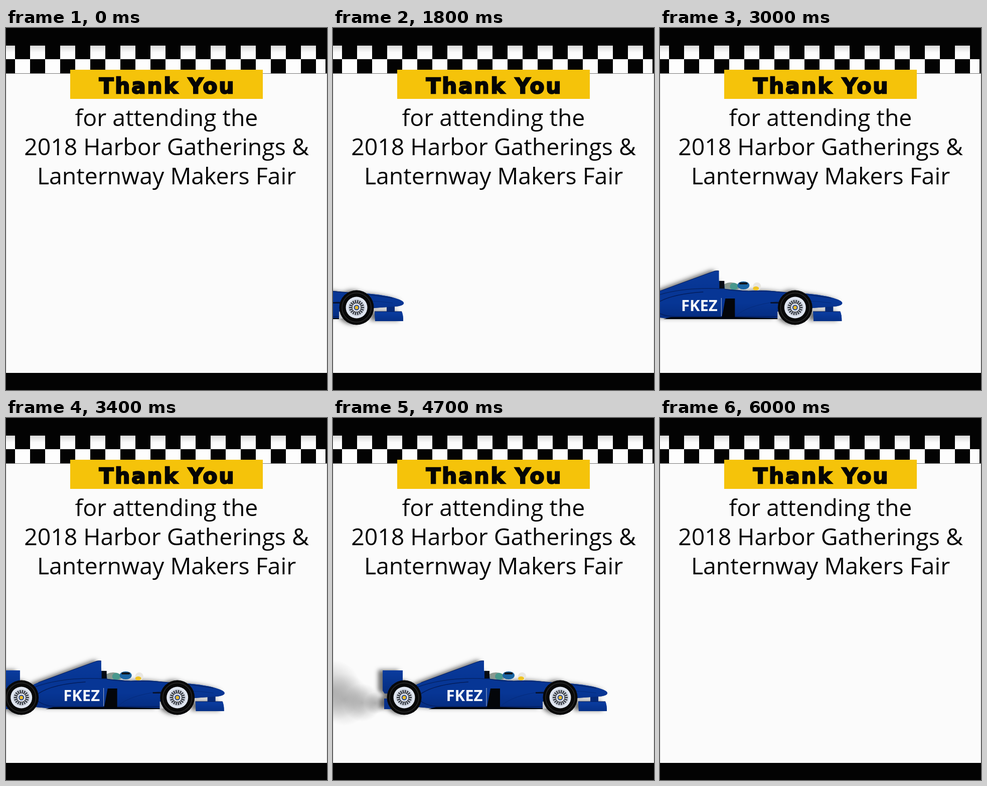
An HTML page with a canvas that plays this animation: 640 px wide and 720 px high, repeating every 8.1 s.

```html
<!DOCTYPE html>
<html lang="en">
<head>
<meta charset="utf-8">
<style>
  html, body { margin: 0; width: 100%; height: 100%; overflow: hidden; background: #fbfbfb; }
  canvas { display: block; width: 640px; height: 720px; }
</style>
</head>
<body>
<canvas id="stage" width="640" height="720"></canvas>
<script>
const ctx = document.getElementById('stage').getContext('2d');
const LOOP = 8100, STEP = 100, STOP_X = 547;
const BLUE = '#073695', DARK = '#031d5c', BLACK = '#030303';

const clamp = v => Math.max(0, Math.min(1, v));
const progress = (t, from, to) => clamp((t - from) / (to - from));
const lerp = (a, b, u) => a + (b - a) * u;

function rect(x, y, w, h, fill) {
  ctx.fillStyle = fill;
  ctx.fillRect(x, y, w, h);
}

function shape(d, fill) {
  ctx.fillStyle = fill;
  ctx.fill(new Path2D(d));
}

function line(d, color, width = 1) {
  ctx.strokeStyle = color;
  ctx.lineWidth = width;
  ctx.stroke(new Path2D(d));
}

function disc(x, y, r, fill) {
  oval(x, y, r, r, fill);
}

function oval(x, y, rx, ry, fill) {
  ctx.beginPath();
  ctx.ellipse(x, y, rx, ry, 0, 0, Math.PI * 2);
  ctx.fillStyle = fill;
  ctx.fill();
}

function label(text, x, y, font, color, { spacing = 0, outline = 0 } = {}) {
  ctx.font = font;
  ctx.textAlign = 'center';
  ctx.letterSpacing = spacing + 'px';
  ctx.fillStyle = ctx.strokeStyle = color;
  ctx.fillText(text, x + spacing / 2, y);
  if (outline) {
    ctx.lineWidth = outline;
    ctx.strokeText(text, x + spacing / 2, y);
  }
  ctx.letterSpacing = '0px';
}

function verticalFade(y0, y1, ...colors) {
  const g = ctx.createLinearGradient(0, y0, 0, y1);
  colors.forEach((c, i) => g.addColorStop(i / (colors.length - 1), c));
  return g;
}

function drawBackdrop() {
  rect(0, 0, 640, 720, '#fbfbfb');
  rect(0, 90, 1, 597, '#dedede');
  rect(639, 90, 1, 597, '#dedede');
  rect(0, 0, 640, 91, BLACK);
  const shade = verticalFade(35, 62, '#d8d8d8', '#fbfbfb', '#ffffff');
  for (let x = -12; x < 640; x += 60) {
    rect(x, 35, 30, 27, shade);
    rect(x + 30, 62, Math.min(30, 607 - x), 28, '#fdfdfd');
  }
  rect(0, 90, 640, 1, '#777');
  rect(0, 686, 640, 34, BLACK);
}

function drawHeading() {
  rect(128, 83, 384, 58, '#f5c30a');
  label('Thank You', 320, 130, '700 42px "DejaVu Sans", sans-serif', '#050505',
    { spacing: 3, outline: 2.5 });
  ['for attending the', '2018 Harbor Gatherings &', 'Lanternway Makers Fair'].forEach((text, i) =>
    label(text, 320, 195 + i * 58, '46.4px "Open Sans", "Noto Sans", sans-serif', '#050505'));
}

function drawWheel(x, y) {
  disc(x, y, 34.5, '#080808');
  ctx.beginPath();
  ctx.arc(x, y, 29, 0, Math.PI * 2);
  ctx.strokeStyle = '#2b2b2b';
  ctx.lineWidth = 1.5;
  ctx.stroke();
  disc(x, y, 21.5, '#dfe5f0');
  disc(x, y, 16, '#b9bfca');
  ctx.strokeStyle = '#262a32';
  ctx.lineWidth = 2;
  for (let i = 0; i < 18; i++) {
    const a = i * Math.PI / 9, c = Math.cos(a), s = Math.sin(a);
    ctx.beginPath();
    ctx.moveTo(x + c * 8, y + s * 8);
    ctx.lineTo(x + c * 15, y + s * 15);
    ctx.stroke();
  }
  disc(x, y, 8, '#e6e9ef');
  disc(x, y, 5.5, '#23448f');
  disc(x, y, 3.5, '#e8b92c');
}

const BODY = 'M150 545 Q158 533 176 526 Q230 506 288 485 Q294 482 301 483 L301 503 L311 505 ' +
  'L313 519 L360 523 Q395 520 430 526 Q496 528 525 536 Q547 542 547 547 Q547 553 528 554 ' +
  'L486 557 L418 564 L418 578 L205 578 L160 574 Z';
const WING = 'M99 502 H139 V530 L122 548 H103 L99 542 Z';
const TAIL = 'M102 558 H118 V579 H102 Z';
const FRONT_WING = 'M489 564 H543 Q546 570 546 583 H490 Z';

function drawShadow() {
  ctx.save();
  ctx.shadowColor = 'rgba(0,0,0,.55)';
  ctx.shadowBlur = 9;
  ctx.shadowOffsetX = -9;
  ctx.shadowOffsetY = -1;
  const silhouette = new Path2D(BODY);
  [WING, TAIL, FRONT_WING].forEach(d => silhouette.addPath(new Path2D(d)));
  for (const x of [142, 453]) {
    silhouette.moveTo(x + 34, 556);
    silhouette.arc(x, 556, 34, 0, Math.PI * 2);
  }
  ctx.fillStyle = BLUE;
  ctx.fill(silhouette);
  ctx.restore();
}

function drawRiders() {
  oval(325, 515, 17, 9, '#8b9990');
  oval(331, 514, 8, 7, '#48988c');
  oval(350, 512, 12, 8, '#1b65a4');
  rect(342, 506, 16, 4, '#11151c');
  oval(377, 514, 8, 8, '#e9e7e2');
  oval(375, 518, 6, 4, '#efc426');
}

function drawCar(nose) {
  ctx.save();
  ctx.translate(nose - STOP_X, 0);
  drawShadow();
  drawRiders();
  shape(WING, verticalFade(502, 548, '#0a3c9f', '#052c7d'));
  shape(TAIL, '#06308a');
  rect(513, 552, 16, 13, '#052a78');
  shape(BODY, verticalFade(483, 578, '#0a3a9b', BLUE, BLUE, '#052c80'));
  rect(302, 503, 10, 15, '#070b14');

  line('M301 483 Q294 482 288 485 Q230 506 176 526', DARK);
  line('M166 536 Q225 514 310 519 Q345 525 385 523 Q450 525 525 537', '#052468', 1.5);
  line('M176 548 Q205 529 270 525', DARK, 1.5);
  line('M175 563 Q190 575 224 574 H418', '#041f61', 1.5);
  shape('M205 575 H335 L418 577 V579 H190 Z', '#02050c');
  line('M335 573 Q356 552 418 544 Q475 540 525 547', '#052b7b');
  line('M306 537 V573', '#aab7d2');
  shape('M314 538 H333 V575 H307 L310 560 Z', '#04060a');
  rect(404, 545, 17, 3, '#071431');
  rect(418, 564, 7, 14, '#c5c8ce');

  shape(FRONT_WING, verticalFade(564, 583, '#0a3da2', '#063087'));
  line('M489 564 H543', DARK);
  label('FKEZ', 262, 563, '700 31px "Open Sans", "Noto Sans", sans-serif', '#f7f8fb');
  drawWheel(142, 556);
  drawWheel(453, 556);
  ctx.restore();
}

function puff(x, y, r, alpha) {
  const g = ctx.createRadialGradient(x, y, 0, x, y, r);
  g.addColorStop(0, `rgba(90,90,90,${alpha})`);
  g.addColorStop(0.5, `rgba(100,100,100,${alpha * 0.6})`);
  g.addColorStop(1, 'rgba(120,120,120,0)');
  disc(x, y, r, g);
}

function drawSmoke(t) {
  const strength = progress(t, 4200, 4700) * (1 - progress(t, 5400, 6000));
  if (!strength) return;
  const drift = (t - 4700) / 100;
  ctx.save();
  ctx.globalAlpha = strength;
  puff(84, 567, 22, 0.4);
  puff(58 - drift * 0.5, 566, 38, 0.38);
  puff(22 - drift, 560, 52, 0.34);
  puff(-5 - drift, 542, 62, 0.36);
  ctx.restore();
}

function noseAt(t) {
  if (t < 2600) return lerp(-9, 291, progress(t, 1000, 2600));
  if (t < 3800) return lerp(291, 508, progress(t, 2600, 3800));
  if (t < 5400) return lerp(508, STOP_X, 1 - (1 - progress(t, 3800, 4200)) ** 2);
  return STOP_X + 590 * progress(t, 5400, 6000) ** 1.5;
}

const start = performance.now();

function frame() {
  const elapsed = (performance.now() - start) % LOOP;
  const t = Math.floor(elapsed / STEP) * STEP;
  drawBackdrop();
  drawHeading();
  if (t >= 1000 && t < 6000) {
    drawSmoke(t);
    drawCar(noseAt(t));
  }
  requestAnimationFrame(frame);
}

frame();
</script>
</body>
</html>
```
